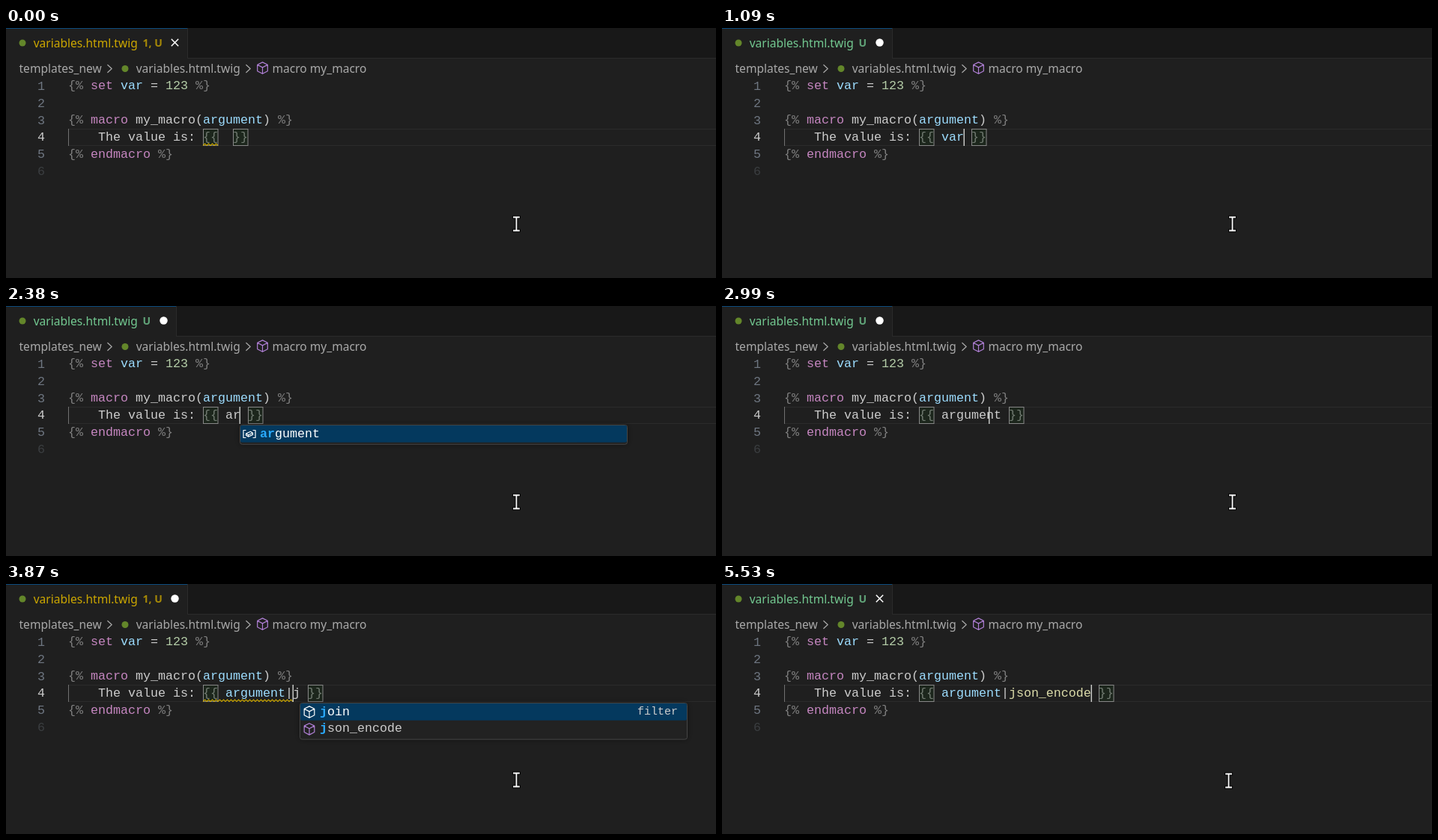
Write an HTML page that moves like this. It is 948x335 px and loops after 5610 ms.

```html
<!DOCTYPE html>
<html lang="en">
<head>
<meta charset="utf-8">
<title>Editor completion</title>
<style>
  html, body { margin: 0; width: 100%; height: 100%; overflow: hidden; background: #1f1f1f; }
  svg { display: block; width: 948px; height: 335px; }
  text { white-space: pre; font: 16.664px "Liberation Mono", monospace; fill: #ccc; }
  .ui { font: 15.55px "Noto Sans", sans-serif; fill: #a9a9a9; }
  .badge { font: 600 14px "Noto Sans", sans-serif; opacity: .78; }
  .num { fill: #6e7681; }
  .detail { font-size: 15px; text-anchor: end; }
  .hit { font-weight: bold; fill: #2aaaff; }
  .line { fill: none; stroke-width: 1.2; stroke-linejoin: round; stroke-linecap: round; }
</style>
</head>
<body>
<svg viewBox="0 0 948 335">
  <defs>
    <path id="cube" class="line" d="M0-7.6 6.8-4.2V4.2L0 7.8-6.8 4.2V-4.2ZM-6.8-4.2 0-.6 6.8-4.2M0-.6V7.8"/>
    <path id="slot" class="line" d="M-5-5H-8V5H-5M5-5H8V5H5M-4.5-.5 1.5-3.2 4.5-1.2V1L-1.5 3.6-4.5 1.8ZM-4.5-.5-1.5 1.2 4.5-1.2M-1.5 1.2V3.6"/>
    <path id="chevron" class="line" stroke="#a9a9a9" d="M-2.7-5 2.7 0-2.7 5"/>
    <filter id="shade" x="-5%" y="-20%" width="110%" height="140%">
      <feDropShadow dx="0" dy="0" stdDeviation="4" flood-color="#000" flood-opacity=".36"/>
    </filter>
  </defs>
  <rect width="948" height="335" fill="#1f1f1f"/>
  <rect width="948" height="41" fill="#181818"/>
  <rect y="40" width="948" height="1" fill="#2b2b2b"/>
  <g id="tab"></g>
  <circle cx="22" cy="20" r="4.5" fill="#63862a"/>

  <text class="ui" x="17.5" y="60">templates_new</text>
  <use href="#chevron" x="138.5" y="54.5"/>
  <circle cx="159" cy="54.5" r="4.5" fill="#63862a"/>
  <text class="ui" x="173.7" y="60">variables.html.twig</text>
  <use href="#chevron" x="323.5" y="54.5"/>
  <use href="#cube" x="342.5" y="53.5" stroke="#b180d7"/>
  <text class="ui" x="355.5" y="60">macro my_macro</text>

  <path d="M83 135.5H948M83 157.5H948" stroke="#2b2b2b"/>
  <path d="M83.5 135V158" stroke="#707070"/>
  <g id="code"></g>
  <g id="edit"></g>
  <g id="menu"></g>
  <g id="mouse">
    <path d="M-3.5-9H3.5M-3.5 9H3.5M0-9V9" fill="none" stroke="#000" stroke-width="4" stroke-linecap="square"/>
    <path d="M-3.5-9H3.5M-3.5 9H3.5M0-9V9" fill="none" stroke="#fff" stroke-width="1.8" stroke-linecap="square"/>
  </g>
</svg>
<script>
const LOOP = 5610, CHAR = 10, LEFT = 83, ROW = 22.8;
const GREY = '#808080', PINK = '#c586c0', BLUE = '#9cdcfe', TEXT = '#cccccc',
      FILTER = '#569cd6', CALL = '#dcdcaa', WARN = '#cca700', GREEN = '#73c991';
const $ = id => document.getElementById(id);
const base = n => 82.4 + ROW * (n - 1);
const spans = parts => parts.map(([s, c]) => `<tspan fill="${c}">${s}</tspan>`).join('');
const line = (n, parts, x = LEFT) => `<text x="${x}" y="${base(n)}">${spans(parts)}</text>`;

const OPEN = ['{% ', GREY], CLOSE = [' %}', GREY];
$('code').innerHTML =
  line(1, [OPEN, ['set ', PINK], ['var', BLUE], [' = ', TEXT], ['123', '#b5cea8'], CLOSE]) +
  line(3, [OPEN, ['macro', PINK], [' my_macro(', TEXT], ['argument', BLUE], [')', TEXT], CLOSE]) +
  line(5, [OPEN, ['endmacro', PINK], CLOSE]) +
  [1, 2, 3, 4, 5, 6].map(n => `<text class="num" x="42" y="${base(n) + .5}"` +
    ` style="fill:${n == 4 ? TEXT : n == 6 ? '#3b3e41' : '#6e7681'}">${n}</text>`).join('');

// Completion lists: caret column, typed query, rows, detail of the first row
const menu = (col, query, rows, detail = '', icon = 'cube') => ({ col, query, rows, detail, icon });
const menuV = menu(22, 'v', ['var', 'asset_version'], '123', 'slot');
const menuA = menu(22, 'a', ['argument', 'asset', 'asset_version', 'absolute_url', 'attribute'], '', 'slot');
const menuAr = menu(23, 'ar', ['argument'], '', 'slot');
const menuAll = menu(30, '', ['abs', 'batch', 'capitalize', 'column', 'convert_encoding',
  'country_name', 'currency_name', 'data_uri'], 'filter');
const menuJ = menu(31, 'j', ['join', 'json_encode'], 'filter');
const menuJs = menu(32, 'js', ['json_encode'], 'filter');

const plain = s => [[s, TEXT]];
const piped = (s, c = TEXT) => [['argument', BLUE], ['|', TEXT], [s, c]];

// Each step changes only the listed parts; caret is a column, warn the underlined length
const steps = [
  [0, { typed: [], caret: null, warn: 2, dirty: false, menu: null, mouse: [681.5, 262.5] }],
  [410, { typed: plain('v'), caret: 21, dirty: true }],
  [480, { caret: 22 }],
  [560, { menu: menuV }],
  [650, { warn: 0 }],
  [840, { typed: plain('var'), menu: null, caret: 22.6 }],
  [930, { caret: 24 }],
  [1090, { typed: [['var', BLUE]] }],
  [1360, { typed: [], caret: 23.4 }],
  [1430, { caret: 21.3 }],
  [1500, { caret: 21 }],
  [1610, { warn: 2 }],
  [1960, { typed: plain('a'), caret: 21 }],
  [2030, { caret: 22 }],
  [2110, { warn: 0, menu: menuA }],
  [2310, { typed: plain('ar'), menu: menuAr }],
  [2380, { caret: 22.9 }],
  [2450, { caret: 23 }],
  [2920, { typed: plain('argument'), menu: null }],
  [2990, { caret: 27.35 }],
  [3080, { typed: [['argument', BLUE]], caret: 29 }],
  [3340, { typed: piped('') }],
  [3410, { caret: 29.9 }],
  [3480, { caret: 30 }],
  [3590, { menu: menuAll }],
  [3700, { warn: 12 }],
  [3870, { typed: piped('j'), menu: menuJ }],
  [3940, { caret: 31 }],
  [4030, { typed: piped('js'), menu: menuJs }],
  [4110, { caret: 32 }],
  [4190, { typed: piped('js', FILTER), warn: 0 }],
  [4420, { typed: piped('json_encode', FILTER), menu: null }],
  [4460, { typed: piped('json_encode', CALL), caret: 41 }],
  [4750, { caret: null }],
  [5050, { caret: 41, dirty: false }],
  [5130, { caret: null }],
  [5380, { caret: 41 }],
  [5530, { mouse: [676.5, 263.5] }]
];
let last = {};
const states = steps.map(([at, change]) => last = { ...last, ...change, at });

function tab({ warn, dirty }) {
  const right = warn ? 243 : 228, x = right - 17.5, color = warn ? WARN : GREEN;
  const mark = dirty
    ? `<circle cx="${x}" cy="19.5" r="5.2" fill="#fff"/>`
    : `<path d="M${x - 4.7} 14.8l9.4 9.4m0-9.4l-9.4 9.4" stroke="#fff" stroke-width="1.5"/>`;
  return `<rect width="${right}" height="41" fill="#1f1f1f"/>
    <rect width="${right}" height="1" fill="#0a4a7c"/>
    <rect x="${right - 1}" width="1" height="41" fill="#2b2b2b"/>
    <text class="ui" x="36.7" y="26" style="fill:${color}">variables.html.twig</text>
    <text class="badge" x="182.5" y="25" style="fill:${color}">${warn ? '1, U' : 'U'}</text>${mark}`;
}

function squiggle(n) {
  let d = 'M263 157.5';
  for (let i = 0; i < n * CHAR / 2.5; i++) d += `l2.5 ${i % 2 ? 2.4 : -2.4}`;
  return `<path d="${d}" fill="none" stroke="${WARN}" stroke-width="1.1"/>`;
}

const bracket = x =>
  `<rect x="${x + .5}" y="135.5" width="19.5" height="22" fill="#006400" fill-opacity=".1" stroke="#888"/>`;

function edit({ typed, caret, warn }) {
  const size = typed.reduce((n, [s]) => n + s.length, 0);
  const end = LEFT + CHAR * (22 + size);
  return line(4, [['    The value is: ', TEXT], ['{{ ', GREY], ...typed, [' }}', GREY]]) +
    bracket(263) + bracket(end) + (warn ? squiggle(warn) : '') +
    (caret === null ? '' :
      `<rect x="${LEFT + caret * CHAR - .5}" y="135" width="1.5" height="23" fill="#c4c5c3"/>`);
}

function label(name, query) {
  const i = name.indexOf(query), j = i + query.length;
  return `${name.slice(0, i)}<tspan class="hit">${query}</tspan>${name.slice(j)}`;
}

function list(m) {
  if (!m) return '';
  const x = LEFT + m.col * CHAR - 1, top = 160;
  const rows = m.rows.map((name, i) => {
    const y = top + i * ROW, icon = i ? 'cube' : m.icon;
    return `<use href="#${icon}" x="${x + 13}" y="${y + 11.5}" stroke="${i ? '#b180d7' : '#fff'}"/>
      <text x="${x + 27}" y="${y + 15.6}" style="fill:${i ? TEXT : '#fff'}">${label(name, m.query)}</text>`;
  }).join('');
  return `<rect x="${x + .5}" y="159.5" width="517" height="${m.rows.length * ROW + 3}" rx="3"
      fill="#202020" stroke="#454545" filter="url(#shade)"/>
    <rect x="${x + 1}" y="${top}" width="516" height="${ROW}" rx="2" fill="#04395e"/>${rows}
    <text class="detail" x="${x + 505}" y="175.2">${m.detail}</text>`;
}

let shown;
function frame() {
  const t = performance.now() % LOOP;
  const s = states.findLast(state => state.at <= t);
  if (s !== shown) {
    shown = s;
    $('tab').innerHTML = tab(s);
    $('edit').innerHTML = edit(s);
    $('menu').innerHTML = list(s.menu);
    $('mouse').setAttribute('transform', `translate(${s.mouse})`);
  }
  requestAnimationFrame(frame);
}
frame();
</script>
</body>
</html>
```
